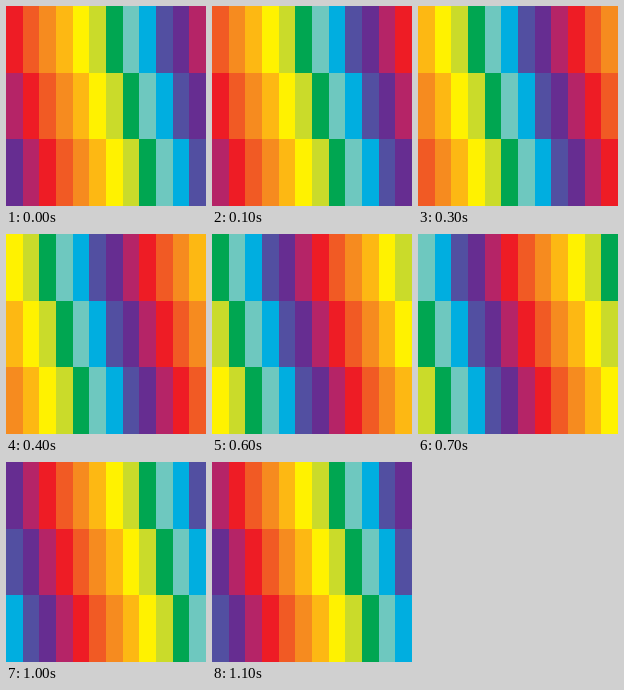
An HTML page with a canvas that plays this animation: 200 px wide and 200 px high, repeating every 1.2 s.

```html
<!DOCTYPE html>
<html>
<head>
<meta charset="utf-8">
<title>Rainbow columns</title>
<style>
  html, body { margin: 0; width: 100%; height: 100%; overflow: hidden; }
  canvas { display: block; width: 100%; height: 100%; }
</style>
</head>
<body>
<canvas width="200" height="200"></canvas>
<script>
const colors = [
  '#ee1c25', '#f15a24', '#f68b1f', '#fdb813', '#fff200', '#cadb2a',
  '#00a651', '#6ec8bf', '#00aee0', '#524fa1', '#662d91', '#b52467'
];
const SIZE = 200, ROWS = 3, STEP = 100;
const count = colors.length;
const ctx = document.querySelector('canvas').getContext('2d');
const edge = (i, n) => Math.round(i * SIZE / n);
const start = performance.now();

function draw(now) {
  const step = Math.floor(Math.max(0, now - start) / STEP) % count;
  for (let row = 0; row < ROWS; row++) {
    const y = edge(row, ROWS);
    for (let col = 0; col < count; col++) {
      const x = edge(col, count);
      // Each row trails the one above by one colour.
      ctx.fillStyle = colors[(col + step - row + count) % count];
      ctx.fillRect(x, y, edge(col + 1, count) - x, edge(row + 1, ROWS) - y);
    }
  }
  requestAnimationFrame(draw);
}
draw(start);
</script>
</body>
</html>
```
